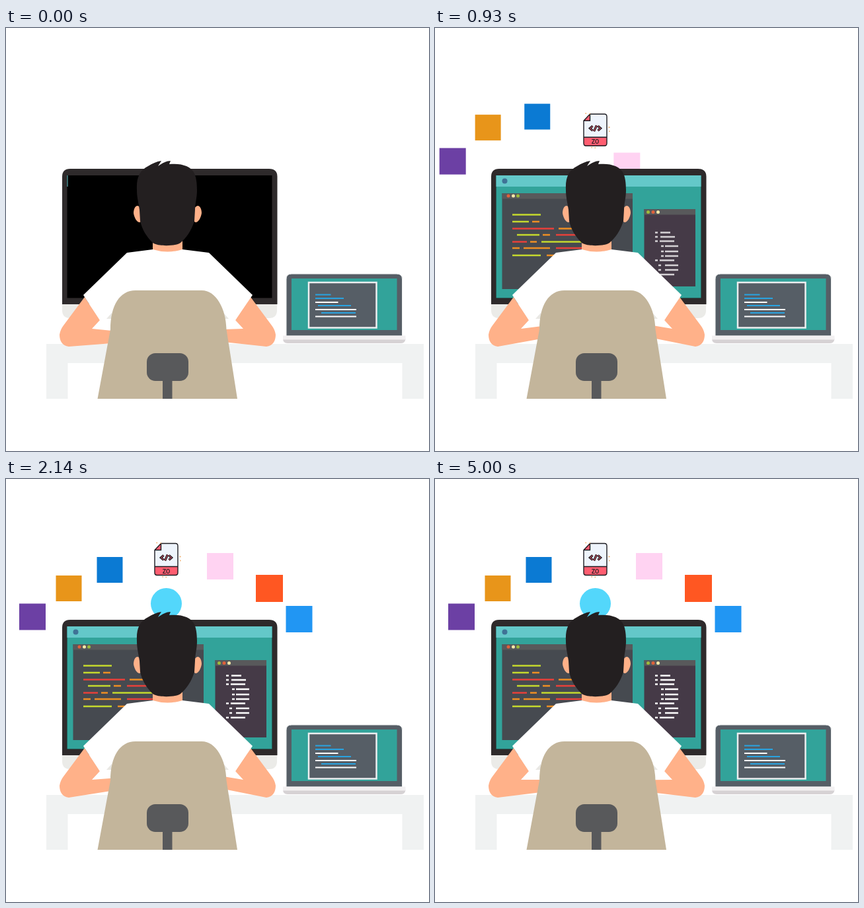
An HTML page for the animation above (5.07 s loop, 640 by 640 pixels).

```html
<!DOCTYPE html>
<html lang="en">
<head>
<meta charset="utf-8">
<style>
html, body { margin: 0; width: 100%; height: 100%; overflow: hidden; background: #fff; }
svg { display: block; width: 100%; height: 100%; }
</style>
</head>
<body>
<svg viewBox="0 0 640 640">
  <path fill="#f0f2f2" d="M61 478H632V561H599.5V507H93.5V561H61Z"/>

  <g id="icons"></g>

  <!-- monitor -->
  <path fill="#ebebe8" d="M85 418H410V427Q410 439 398 439H97Q85 439 85 427Z"/>
  <path fill="#2e2a2b" d="M85 418V225Q85 213 97 213H398Q410.500 213 410.500 225V418Z"/>
  <path d="M92.500 223H402.500V408.500H92.500Z"/>
  <path id="desktop" fill="#32a39a" d="M92.500 223H402.500V408.500H92.500Z"/>
  <rect id="bar" x="92.500" y="223" height="17" fill="#64c8c9"/>
  <circle id="menu" cx="105.500" cy="231.500" r="4" fill="#3f7396"/>
  <g id="editor">
    <path fill="#464a50" d="M101.500 250H299V395H101.500Z"/>
    <path fill="#58595b" d="M101.500 250H299V258.500H101.500Z"/>
    <circle cx="111" cy="254" r="2.500" fill="#e0603a"/>
    <circle cx="118.500" cy="254" r="2.500" fill="#f3e8a8"/>
    <circle cx="125.500" cy="254" r="2.500" fill="#9dbb3a"/>
  </g>
  <g id="panel">
    <path fill="#453a47" d="M316.500 274H394V391H316.500Z"/>
    <path fill="#58595b" d="M316.500 274H394V282.500H316.500Z"/>
    <circle cx="322.500" cy="278.500" r="2.500" fill="#9dbb3a"/>
    <circle cx="330" cy="278.500" r="2.500" fill="#e0603a"/>
    <circle cx="337.500" cy="278.500" r="2.500" fill="#f3e8a8"/>
  </g>
  <g id="code" fill="none" stroke-width="2.500">
    <path stroke="#c5d92d" d="M117 282.500H160M117 293H142M124 313H158M161 323.500H224M117 344H160"/>
    <path stroke="#ee8e23" d="M147 293H158M187 303.500H215M163 313H174M144 323.500H154M117 333H128M134 333H174M169 344H181"/>
    <path stroke="#e8403a" d="M117 303.500H180M183 313H215M117 323.500H139M183 333H230"/>
  </g>
  <path id="list" fill="none" stroke="#fff" stroke-width="2.600" d="M333 297.500h4m4 0h15M333 304h4m4 0h22M333 310.500h4m3 0h22M342 318h4m2 0h20M342 326h4m2 0h20M342 333h4m2 0h20M333 339.500h4m3 0h22M338 347h4m6 0h20M338 354h4m6 0h20M333 361h4m3 0h22"/>

  <!-- laptop -->
  <path fill="#565e66" stroke="#eef0f0" d="M424 466V380Q424 372 432 372H591Q599.500 372 599.500 380V466Z"/>
  <path fill="#32a39a" d="M432 379H591.500V457H432Z"/>
  <path fill="#565e66" stroke="#eceef0" stroke-width="2.500" d="M458 385H560.500V453.500H458Z"/>
  <g fill="none" stroke-width="2">
    <path stroke="#29a3e0" d="M468 403.500H491.500M468 409H511M472 420H522M477 431H529"/>
    <path stroke="#fff" d="M468 415H502.500M468 426H530M468 436.500H530"/>
  </g>
  <path fill="#d6d2d4" d="M419 470H604.500Q604 477 598 477H426Q419 477 419 470Z"/>
  <path fill="#f2f0f1" d="M419 465.500H604.500V471.500H419Z"/>

  <!-- person -->
  <path class="arm" fill="#ffb189"/>
  <path class="arm" fill="#ffb189" transform="matrix(-1 0 0 1 489 0)"/>
  <path fill="#ffb189" d="M222 315H267V340H222Z"/>
  <path fill="#fff" d="M222 335Q244.500 342 267 335L307 340 373 404 347 442 329 440H160L142 442 117 404 183 340Z"/>
  <path fill="#e9e8e4" d="M152 440L160 431V440ZM337 440L329 431V440Z"/>
  <path id="ear" fill="#ffb189" d="M204 273C198 264 193 272 193 280 194 287 199 297 204 293Z"/>
  <use href="#ear" transform="matrix(-1 0 0 1 489 0)"/>
  <path fill="#231f20" d="M198 245C197 225 203 215 215 209 221 205 228 202 235 201L230 209C237 204 243 201 249 201L247 206C258 205 266 206 273 209 284 214 289 222 289 245 289 258 286 265 286 275L285 292C280 308 273 317 264 325 258 330 230 331 222 325 212 315 206 305 203 292L202 275C200 262 198 256 198 245Z"/>

  <!-- chair -->
  <path fill="#c3b59b" d="M138.500 561L158 456C158 420 172 397 196 397H296C318 397 333 425 333.500 456L350 561Z"/>
  <path fill="#58595b" d="M237 530H251.500V561H237Z"/>
  <rect x="213" y="492" width="63" height="42" rx="13" fill="#58595b"/>
</svg>
<script>
const LOOP = 5070, FPS = 14;
const $ = id => document.getElementById(id);

const tile = (size, color) =>
  `<rect x="${-size / 2}" y="${-size / 2}" width="${size}" height="${size}" fill="${color}"/>`;
const scriptFile = `
  <path d="M-8 -24H14Q17.500 -24 17.500 -20V20Q17.500 24 14 24H-14Q-17.500 24 -17.500 20V-14Z" fill="#eef4fc"/>
  <path d="M-17.500 11H17.500V20Q17.500 24 14 24H-14Q-17.500 24 -17.500 20ZM-8 -24V-14H-17.500Z" fill="#ff5d70"/>
  <path d="M-8 -24H14Q17.500 -24 17.500 -20V20Q17.500 24 14 24H-14Q-17.500 24 -17.500 20V-14ZV-14H-17.500M-17.500 11H17.500" fill="none" stroke="#1c1c22" stroke-width="1.400"/>
  <path d="M-4 -6L-8 -2.500-4 1M4 -6L8 -2.500 4 1M2 -7L-2 2" fill="none" stroke="#1c1c22" stroke-width="3.400"/>
  <path d="M-4 -6L-8 -2.500-4 1M4 -6L8 -2.500 4 1M2 -7L-2 2" fill="none" stroke="#ff5d70"/>
  <text y="21" text-anchor="middle" font-family="Roboto, sans-serif" font-size="9" font-weight="500" fill="#1c1c22">ZO</text>
  <path d="M-15 -25h1.500M-9 -24.500h1.500M20 -4h2M20.500 2h1.500M-6 26.500h1.500M-1 27h1.500" stroke="#f2a65a" stroke-width="1.500"/>`;

// x, y: resting centre; dx, dy: flight direction; delay in ms; dist: flight length
const icons = [
  { x: 40, y: 208.5, dx: -.89, dy: -.46, delay: 0, art: tile(40, '#6c40a4') },
  { x: 95, y: 165.5, dx: -.71, dy: -.71, delay: 120, dist: 172, art: tile(39, '#e8951a') },
  { x: 157, y: 137.5, dx: -.55, dy: -.83, delay: 240, art: tile(39, '#0b7ad3') },
  { x: 242.5, y: 121.5, dx: 0, dy: -.9, delay: 360, art: scriptFile },
  { x: 324, y: 132, dx: .4, dy: -.91, delay: 480, art: tile(40, '#ffd3f2') },
  { x: 398.5, y: 165.5, dx: .71, dy: -.71, delay: 600, art: tile(41, '#ff5722') },
  { x: 443.5, y: 212, dx: .89, dy: -.46, delay: 720, art: tile(40, '#2196f3') },
  { x: 242.5, y: 188.5, dx: 0, dy: -1.1, delay: 1000, art: '<circle r="23.500" fill="#53d7fb"/>' }
];
$('icons').innerHTML = icons.map(i => `<g>${i.art}</g>`).join('');
const iconNodes = [...$('icons').children];
const arms = document.querySelectorAll('.arm');

const progress = (t, from, to) => Math.min(1, Math.max(0, (t - from) / (to - from)));
const ease = (t, from, to) => (1 - Math.cos(Math.PI * progress(t, from, to))) / 2;

// Distance still to fly: past the resting place by 21, then back to it
function remaining(t, dist = 129) {
  return dist - (dist + 21) * ease(t, 235, 815) + 21 * ease(t, 815, 1130);
}

function popIn(node, p, cx, cy) {
  node.setAttribute('transform', `translate(${cx} ${cy}) scale(${p}) translate(${-cx} ${-cy})`);
}

function riseIn(node, t, from, to) {
  const p = ease(t, from, to);
  node.setAttribute('transform', `translate(0 ${34 * (1 - p)})`);
  node.setAttribute('opacity', t > from ? .35 + .65 * p : 0);
}

function setArm(node, hand) {
  node.setAttribute('d', `M119 407L142 442 130 455 160 ${hand}V${hand + 19}L95 482C85 481 81 473 81 464 82 458 84 454 87 450Z`);
}

function draw(now) {
  const step = Math.floor((now % LOOP) * FPS / 1000 + .07);
  const t = step * 1000 / FPS;

  $('bar').setAttribute('width', 1 + 309 * ease(t, 0, 300));
  $('desktop').setAttribute('opacity', ease(t, 60, 320));
  $('menu').setAttribute('opacity', ease(t, 150, 350));
  popIn($('editor'), ease(t, 220, 500), 200, 322);
  popIn($('panel'), ease(t, 320, 580), 355, 332);
  riseIn($('code'), t, 580, 930);
  riseIn($('list'), t, 720, 1070);

  icons.forEach((i, k) => {
    const d = remaining(t - i.delay, i.dist);
    iconNodes[k].setAttribute('transform', `translate(${i.x - i.dx * d} ${i.y - i.dy * d})`);
  });

  setArm(arms[0], 454.5 + 3.5 * Math.cos(2 * Math.PI * step / 9));
  setArm(arms[1], 453 + 3 * Math.cos(2 * Math.PI * (step - 43) / 8.67));
}

function tick() {
  draw(performance.now());
  requestAnimationFrame(tick);
}
tick();
</script>
</body>
</html>
```
